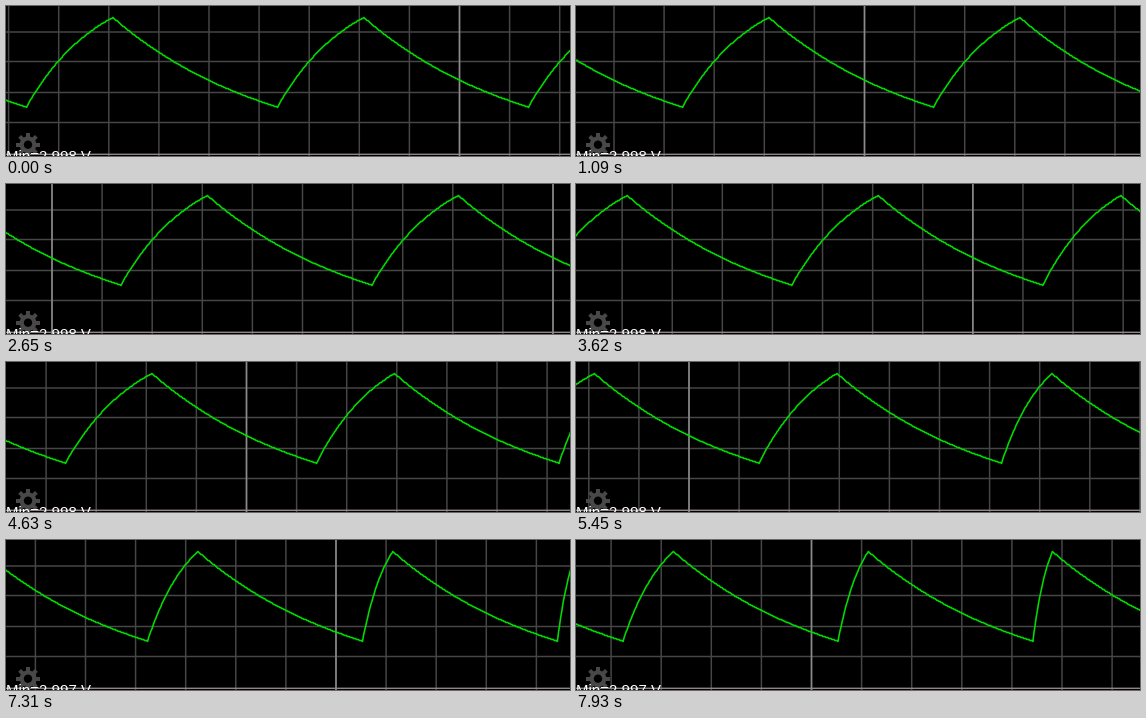
Recreate the animation shown at these times as a matplotlib script. Size 564x150 px, loop 8000 ms.

```python
import numpy as np
import matplotlib.pyplot as plt
from matplotlib.animation import FuncAnimation
from matplotlib.collections import LineCollection
from matplotlib.patches import Circle

W, H, DPI = 564, 150, 64
PX = 72 / DPI              # one pixel in points
LOOP, TICK = 8000, 20      # ms

GRID, AXIS, BASE = "#464646", "#8a8a8a", "#8f8588"
GREEN, GEAR = "#00dc00", "#484848"

# Screen refreshes: (step number, time in ms), evenly spread in between
STEP_NO = [0, 1, 13, 16, 25, 37, 39, 49, 62, 68, 74, 80, 86, 98, 110, 116, 117]
STEP_MS = [0, 70, 880, 1090, 1690, 2520, 2650, 3350, 4220, 4630, 5040, 5450,
           5850, 6680, 7520, 7930, 8000]
STEPS = np.round(np.interp(np.arange(117), STEP_NO, STEP_MS), -1)

# Distance scrolled to the left
SCROLL_MS = [0, 1090, 2650, 4630, 5450, 6680, 7930]
SCROLL_PX = [0, 165, 407.5, 714, 841.5, 1029.5, 1220]

TOP, BOTTOM = 11.5, 101
FALL = 164.6               # discharge time stays fixed
RISES = [86.4] * 5 + [78, 50.3, 30.3, 19.5]
FIRST_TROUGH = 20.5 - 86.4 - FALL
DIV, BRIGHT_X = 50.1, 453.5


def ease_rc(n, k):
    """Capacitor curve from 0 to 1 over n samples."""
    v = np.linspace(0, 1, n)
    return (1 - np.exp(-k * v)) / (1 - np.exp(-k))


def build_wave():
    xs, ys, x = [], [], FIRST_TROUGH
    span = BOTTOM - TOP
    for rise in RISES:
        n = int(rise)
        xs.append(np.linspace(x, x + rise, n))
        ys.append(BOTTOM - span * ease_rc(n, 1.2))
        x += rise
        n = int(FALL)
        xs.append(np.linspace(x, x + FALL, n))
        ys.append(TOP + span * ease_rc(n, 1.03))
        x += FALL
    return np.concatenate(xs), np.floor(np.concatenate(ys)) + 0.5


wave_x, wave_y = build_wave()

fig = plt.figure(figsize=(W / DPI, H / DPI), dpi=DPI, facecolor="black")
ax = fig.add_axes([0, 0, 1, 1])
ax.set_xlim(0, W)
ax.set_ylim(H, 0)
ax.axis("off")

for y in (26, 55.5, 86.5, 116.5):
    ax.plot([0, W], [y, y], color=GRID, lw=1.5 * PX, snap=False, zorder=1)
ax.plot([0, W], [148.3, 148.3], color=BASE, lw=1.4 * PX, snap=False, zorder=2)

columns = LineCollection([], colors=GRID, linewidths=1.5 * PX, zorder=1)
columns.set_snap(False)
ax.add_collection(columns, autolim=False)
bright, = ax.plot([], [], color=AXIS, lw=1.6 * PX, snap=False, zorder=2)
trace, = ax.plot([], [], color=GREEN, lw=1.6 * PX, zorder=3)

# Settings gear
cx, cy = 22, 138.7
ax.add_patch(Circle((cx, cy), 6.3, fill=False, ec=GEAR, lw=4.2 * PX, zorder=4))
for a in np.arange(8) * np.pi / 4:
    ax.plot(cx + np.cos(a) * np.array([7, 11.8]),
            cy + np.sin(a) * np.array([7, 11.8]),
            color=GEAR, lw=4 * PX, solid_capstyle="butt", zorder=4)

label = ax.text(-0.5, 155, "", color="white", family="Liberation Sans",
                fontsize=15 * PX, va="baseline", zorder=5)


def draw(i):
    t = i * TICK + TICK / 2
    now = STEPS[np.searchsorted(STEPS, t, side="right") - 1]
    shift = np.interp(now, SCROLL_MS, SCROLL_PX)

    start = BRIGHT_X - shift
    cols = start % DIV + DIV * np.arange(-1, W // DIV + 2)
    columns.set_segments([[(x, 0), (x, H)] for x in cols])

    major = start % (10 * DIV)
    bright.set_data([major, major, major + 10 * DIV, major + 10 * DIV],
                    [-5, H + 5, H + 5, -5])

    x = wave_x - shift
    seen = (x > -5) & (x < W + 5)
    trace.set_data(x[seen], wave_y[seen])

    label.set_text("Min=2.997 V" if now >= 7300 else "Min=2.998 V")
    return columns, bright, trace, label


anim = FuncAnimation(fig, draw, frames=LOOP // TICK, interval=TICK,
                     init_func=lambda: draw(0), repeat=True, repeat_delay=0)
plt.show()
```
